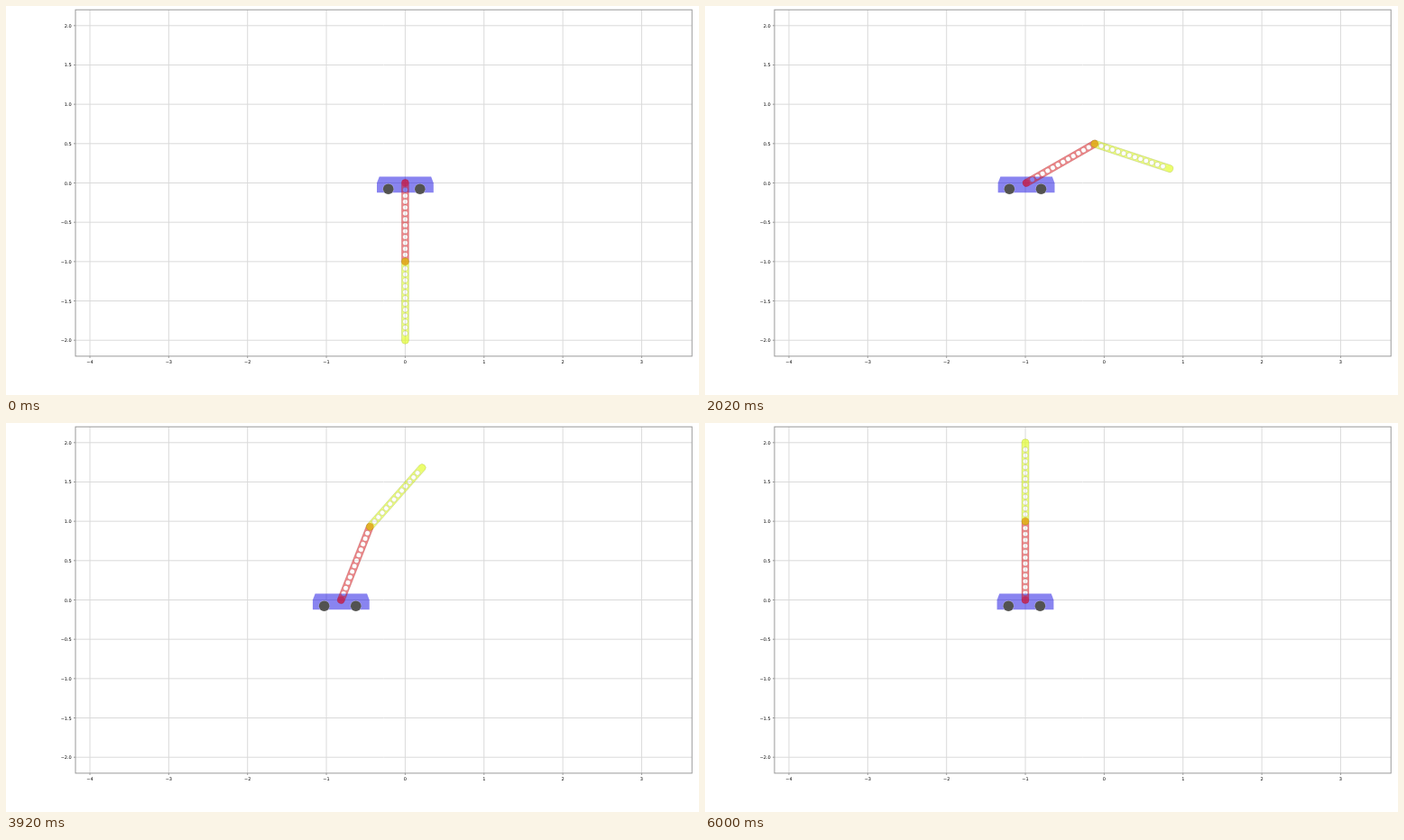
An HTML page with a canvas that plays this animation: 768 by 432 pixels, repeating every 6020 ms.

```html
<!DOCTYPE html>
<html lang="en">
<head>
<meta charset="utf-8">
<title>Double pendulum on a cart</title>
<style>
  html, body { margin: 0; width: 100%; height: 100%; overflow: hidden; background: #fff; }
  canvas { display: block; }
</style>
</head>
<body>
<canvas id="stage" width="768" height="432"></canvas>
<script>
const ctx = document.getElementById('stage').getContext('2d');
const LOOP = 6020, STEP = 20;
const X0 = 442.4, Y0 = 196.5, UNIT = 87.35;
const TAU = Math.PI * 2;

// Smooth curve through [time, value] points, at rest at both ends
function curve(...points) {
  const slope = i => {
    if (i === 0 || i === points.length - 1) return 0;
    const [[t0, v0], [t1, v1], [t2, v2]] = points.slice(i - 1, i + 2);
    const h = t1 - t0, k = t2 - t1;
    return ((v1 - v0) / h * k + (v2 - v1) / k * h) / (h + k);
  };
  return t => {
    const last = points.length - 1;
    if (t >= points[last][0]) return points[last][1];
    const i = points.findIndex(p => p[0] > t) - 1;
    const [t0, v0] = points[i], [t1, v1] = points[i + 1];
    const h = t1 - t0, u = (t - t0) / h, v = 1 - u;
    return v * v * (1 + 2 * u) * v0 + u * u * (1 + 2 * v) * v1 +
      h * u * v * (v * slope(i) - u * slope(i + 1));
  };
}

// Turning points of the swing-up; angles in degrees from hanging down
const cartX = curve([0, X0], [660, 399.7], [1440, 359.5], [1860, 352], [2480, 391.7],
  [2560, 402.3], [2880, 414.5], [3320, 403.5], [3720, 364.7], [4100, 379],
  [4520, 358.4], [4960, 321], [5480, 359.5], [6000, 355]);
const lowerAngle = curve([0, 0], [660, 51.9], [1440, 92.6], [1860, 108.7], [2480, 171.8],
  [2560, 185.3], [2900, 198.5], [3320, 197.7], [3720, 159.3], [4000, 161],
  [4300, 182.5], [4520, 175.7], [4960, 161], [5450, 182], [6000, 180]);
const upperAngle = curve([0, 0], [300, -0.5], [660, 10.2], [1440, 52.4], [1860, 68.3],
  [2560, 77], [3320, 94.6], [3720, 126.7], [4520, 161.3], [5280, 176], [5700, 180]);

function line(x1, y1, x2, y2, color) {
  ctx.strokeStyle = color;
  ctx.lineWidth = 1;
  ctx.beginPath();
  ctx.moveTo(x1, y1);
  ctx.lineTo(x2, y2);
  ctx.stroke();
}

function disc(x, y, r, fill) {
  ctx.beginPath();
  ctx.arc(x, y, r, 0, TAU);
  ctx.fillStyle = fill;
  ctx.fill();
}

const label = (v, digits) => v.toFixed(digits).replace('-', '\u2212');

function drawAxes() {
  const left = 77, right = 760.2, top = 4.2, bottom = 388.9;
  const grid = '#dadada', tick = '#999';
  ctx.font = '5px "DejaVu Sans", sans-serif';
  ctx.textAlign = 'center';
  for (let v = -4; v <= 3; v++) {
    const x = X0 + v * UNIT;
    line(x, top, x, bottom, grid);
    line(x, bottom, x, bottom + 2, tick);
    ctx.fillStyle = '#000';
    ctx.fillText(label(v, 0), x, 397.2);
  }
  ctx.textAlign = 'right';
  for (let v = -2; v <= 2; v += 0.5) {
    const y = Y0 - v * UNIT;
    line(left, y, right, y, grid);
    line(left - 2, y, left, y, tick);
    ctx.fillStyle = '#000';
    ctx.fillText(label(v, 1), 72.8, y + 2);
  }
  ctx.strokeStyle = '#999';
  ctx.lineWidth = 1;
  ctx.strokeRect(left, top, right - left, bottom - top);
}

function drawBody(x) {
  const half = 31.4, roof = 28.7;
  ctx.fillStyle = 'rgba(21,11,225,.5)';
  ctx.beginPath();
  ctx.moveTo(x - half, 207.2);
  ctx.lineTo(x - half, Y0);
  ctx.lineTo(x - roof, 189.4);
  ctx.lineTo(x + roof, 189.4);
  ctx.lineTo(x + half, Y0);
  ctx.lineTo(x + half, 207.2);
  ctx.fill();
}

// A rounded bar with a row of twelve holes; returns its far end
function drawLink(x, y, degrees, fill, edge) {
  const a = degrees * Math.PI / 180;
  const r = 4;
  ctx.save();
  ctx.translate(x, y);
  ctx.rotate(Math.PI / 2 - a);
  ctx.beginPath();
  ctx.arc(0, 0, r, Math.PI / 2, Math.PI * 1.5);
  ctx.arc(UNIT, 0, r, -Math.PI / 2, Math.PI / 2);
  ctx.closePath();
  for (let i = 0; i < 12; i++) {
    const h = UNIT * (0.0875 + 0.075 * i);
    ctx.moveTo(h + 2.8, 0);
    ctx.arc(h, 0, 2.8, 0, TAU);
  }
  ctx.fillStyle = fill;
  ctx.fill('evenodd');
  ctx.strokeStyle = edge;
  ctx.lineWidth = 0.4;
  ctx.stroke();
  ctx.restore();
  return [x + UNIT * Math.sin(a), y + UNIT * Math.cos(a)];
}

function draw(t) {
  const x = cartX(t);
  const red = 'rgba(222,15,20,.5)', yellow = 'rgba(215,250,0,.5)';
  ctx.fillStyle = '#fff';
  ctx.fillRect(0, 0, 768, 432);
  drawAxes();
  drawBody(x);
  const joint = drawLink(x, Y0, lowerAngle(t), red, 'rgba(150,20,20,.5)');
  disc(x, Y0, 4, 'rgba(200,10,60,.4)');
  disc(...joint, 4, 'rgba(240,60,10,.45)');
  const tip = drawLink(...joint, upperAngle(t), yellow, 'rgba(130,150,20,.6)');
  disc(...tip, 4, 'rgba(235,255,70,.3)');
  for (const dx of [-18.7, 16.4]) {
    disc(x + dx, 203.2, 6.2, 'rgba(205,205,215,.6)');
    disc(x + dx, 203.2, 5.8, 'rgba(74,74,68,.92)');
  }
}

const start = performance.now();
function tick() {
  const t = (performance.now() - start) % LOOP;
  draw(Math.floor(t / STEP) * STEP);
  requestAnimationFrame(tick);
}
tick();
</script>
</body>
</html>
```
